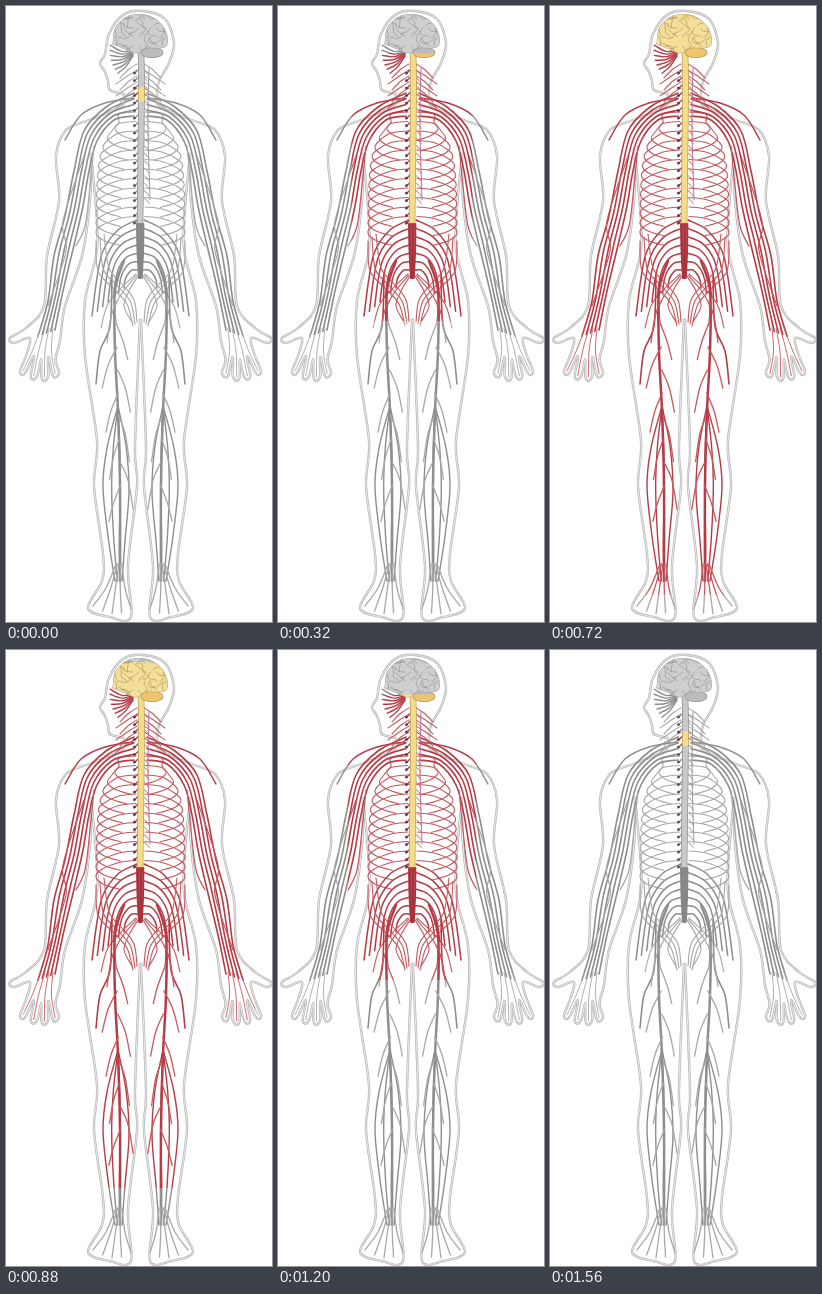
Write an HTML page with a canvas that moves like this. It is 266x616 px and loops after 1.6 s.

```html
<!DOCTYPE html>
<html lang="en">
<head>
<meta charset="utf-8">
<title>Nervous system</title>
<style>
  html, body { margin: 0; width: 100%; height: 100%; overflow: hidden; background: #fff; }
  canvas { display: block; }
</style>
</head>
<body>
<canvas id="stage" width="266" height="616"></canvas>
<script>
const W = 266, H = 616, AXIS = 134.5;
const REST = { nerve: '#8e8e8e', fine: '#a8a8a8', cord: '#c9c9c9', edge: '#8c8c8c', cauda: '#858585',
  brain: '#cfcfcf', cerebellum: '#bcbcbc', crease: '#959595', chain: '#9a9a9a', ganglion: '#555' };
const ACTIVE = { nerve: '#b53c46', fine: '#c6585f', cord: '#f3dd88', edge: '#b59a55', cauda: '#ab333e',
  brain: '#f5df98', cerebellum: '#f0c46c', crease: '#ab9868', chain: '#c46a8e', ganglion: '#573f49' };

const mix = (a, b, t) => a + (b - a) * t;
const range = n => [...Array(n).keys()];

function seeded(seed) {
  return () => (seed = seed * 16807 % 2147483647) / 2147483647;
}

// Smooth line through the points x0, y0, x1, y1, ...
function curve(g, p, color, width) {
  const n = p.length / 2;
  const at = i => { i = Math.max(0, Math.min(n - 1, i)); return [p[2 * i], p[2 * i + 1]]; };
  g.beginPath();
  g.moveTo(p[0], p[1]);
  for (let i = 0; i < n - 1; i++) {
    const [a, b, c, d] = [-1, 0, 1, 2].map(k => at(i + k));
    g.bezierCurveTo(b[0] + (c[0] - a[0]) / 6, b[1] + (c[1] - a[1]) / 6,
      c[0] - (d[0] - b[0]) / 6, c[1] - (d[1] - b[1]) / 6, c[0], c[1]);
  }
  g.strokeStyle = color;
  g.lineWidth = width;
  g.stroke();
}

// Evenly spread lines between two guide curves.
function bundle(g, from, to, count, color, width) {
  for (const i of range(count))
    curve(g, from.map((v, k) => mix(v, to[k], i / (count - 1))), color, width);
}

function oval(g, x, y, rx, ry, fill) {
  g.beginPath();
  g.ellipse(x, y, rx, ry, 0, 0, 7);
  g.fillStyle = fill;
  g.fill();
}

// Draws the left half, then its mirror image.
function bothSides(g, draw) {
  draw();
  g.save();
  g.transform(-1, 0, 0, 1, 2 * AXIS, 0);
  draw();
  g.restore();
}

const fingertip = i => [17 + 10.7 * i, 369 + 6 * Math.sin(i * 0.9)];

function outline(g) {
  const fingers = range(4).flatMap(i => {
    const [x, y] = fingertip(i);
    return [mix(x, 38, 0.3) - 3, y - 20, x - 3, y - 4, x, y, x + 4, y - 5, mix(x, 40, 0.3) + 3, y - 18];
  });
  const arm = [118, 88, 116, 100, 86, 113, 60, 124, 50, 150, 53, 195, 41, 250, 38, 300, 20, 322, 4, 332,
    8, 337, 24, 332, ...fingers, 54, 335, 59, 300, 76, 250, 84, 195, 85, 148];
  const leg = [85, 148, 91, 215, 90, 250, 79, 295, 79, 350, 91, 435, 88, 480, 97, 548, 96, 575, 82, 602,
    104, 611, 125, 611, 122, 560, 131, 480, 129, 440, 134, 314];
  const head = [118, 88, 104, 84, 102, 75, 99, 66, 94, 57, 99, 48, 103, 28, 117, 9, 137, 5,
    159, 13, 168, 37, 163, 57, 153, 75, 151, 88];
  for (const [color, width] of [['#b6b6b6', 2.4], ['#f0f0f0', 0.9]]) {
    bothSides(g, () => [arm, leg].forEach(p => curve(g, p, color, width)));
    curve(g, head, color, width);
  }
}

function ribs(g, c) {
  for (const i of range(12)) {
    const y = 106 + i * 9.5, x = 128 - 38 * (1 - 0.5 * Math.exp(-i / 2));
    curve(g, [130, y, 113, y + 2, x + 4, y + 10, x, y + 17, x + 8, y + 24, x + 24, y + 29], c.fine, 1.1);
  }
}

function armNerves(g, c) {
  curve(g, [127, 92, 99, 97, 75, 109, 59, 134], c.nerve, 1.4);
  bundle(g, [128, 87, 100, 101, 78, 125, 68, 165, 59, 210, 48, 250, 42, 295, 32, 330],
    [128, 110, 108, 114, 91, 135, 83, 165, 77, 200, 69, 235, 57, 285, 49, 324], 5, c.nerve, 1.6);
  bundle(g, [78, 150, 57, 215, 60, 245, 42, 300], [88, 140, 84, 180, 79, 220, 70, 240], 2, c.fine, 1.2);
  for (const i of range(4)) {
    const [x, y] = fingertip(i);
    curve(g, [35 + 4 * i, 322, mix(x, 40, 0.4), 345, x, y - 4], c.fine, 0.9);
  }
}

function pelvicNerves(g, c) {
  bundle(g, [131, 214, 112, 224, 97, 245, 91, 272, 86, 310],
    [132, 264, 126, 264, 122, 268, 119, 274, 118, 282], 7, c.nerve, 1.5);
  bundle(g, [90, 235, 92, 265, 108, 283, 121, 298, 127, 320],
    [98, 228, 103, 262, 116, 278, 128, 294, 131, 316], 3, c.fine, 1.1);
  bundle(g, [130, 268, 112, 285, 101, 300, 95, 322], [132, 270, 123, 285, 118, 300, 126, 316], 3, c.fine, 1.1);
}

function legNerves(g, c) {
  const random = seeded(11);
  curve(g, [118, 255, 109, 285, 109, 345, 112, 405, 114, 480, 114, 575], c.nerve, 2.5);
  curve(g, [106, 270, 104, 320, 94, 345, 90, 378], c.nerve, 1.6);
  bundle(g, [112, 400, 101, 442, 97, 480, 102, 530, 109, 575],
    [112, 400, 120, 440, 123, 485, 119, 535, 116, 575], 4, c.nerve, 1.4);
  for (const i of range(9)) {
    const side = i % 2 ? 1 : -1, y = 295 + i * 23, reach = 9 + 7 * random();
    const x = 110 + (y - 295) * 0.025;
    curve(g, [x, y, x + side * reach * 0.6, y + 18, x + side * reach, y + 35 + 15 * random()], c.fine, 1.3);
  }
  for (const i of range(5)) {
    const x = 87 + 9.5 * i;
    curve(g, [110 + 1.5 * i, 558, mix(x, 113, 0.5), 582, x, 600 + 8 * Math.sin(i * 0.7)], c.fine, 1.3);
  }
}

function spine(g, c) {
  for (const i of range(6)) {
    const y = 58 + i * 6, reach = 16 + i % 2 * 4;
    curve(g, [131, y, 123, y + 5, 130 - reach, y + 14], c.fine, 1.1);
    curve(g, [138, y, 146, y + 5, 139 + reach, y + 14], c.fine, 1.1);
  }
  curve(g, [143, 62, 142, 120, 144, 194], c.chain, 1);
  for (let y = 66; y < 217; y += 7.5) {
    curve(g, [132, y - 2, 128, y + 2], c.nerve, 1.2);
    oval(g, 128.5, y + 1, 1.5, 1.3, c.ganglion);
    if (y < 195) curve(g, [137, y - 2, 141, y + 1, 143, y + 4], c.chain, 1);
  }
  const cord = [135, 46, 135.5, 90, 134, 220];
  curve(g, cord, c.edge, 6.6);
  curve(g, cord, c.cord, 5.2);
  for (const i of range(5)) curve(g, [131 + i * 1.6, 218, 131.5 + i * 1.4, 245, 133 + i * 0.7, 272], c.cauda, 1.9);
}

function brain(g, c) {
  for (const i of range(7)) {
    const angle = 3.3 - i * 0.17, dx = Math.cos(angle), dy = Math.sin(angle);
    curve(g, [127, 44 + i, 127 + 11 * dx, 47 + i + 10 * dy, 127 + 23 * dx, 43 + i + 24 * dy], c.nerve, 1.4);
  }
  oval(g, 146, 46.5, 11.5, 5.5, c.crease);
  oval(g, 146, 46.5, 10.8, 4.8, c.cerebellum);
  curve(g, [107, 38, 110, 21, 123, 10, 143, 10, 158, 22, 160, 40, 140, 42, 130, 47, 117, 42, 107, 38], c.crease, 1);
  g.fillStyle = c.brain;
  g.fill();
  g.save();
  g.clip();
  const random = seeded(5);
  for (const i of range(36)) {
    let x = 109 + i % 9 * 6, y = 13 + Math.floor(i / 9) * 9, heading = random() * 6;
    const fold = [x, y];
    for (const k of range(4)) {
      heading += 2 * random() - 1;
      fold.push(x += 3 * Math.cos(heading), y += 3 * Math.sin(heading));
    }
    curve(g, fold, c.crease, 0.7);
  }
  g.restore();
}

function figure(c) {
  const layer = document.createElement('canvas');
  layer.width = W;
  layer.height = H;
  const g = layer.getContext('2d');
  g.fillStyle = '#fff';
  g.fillRect(0, 0, W, H);
  g.lineCap = g.lineJoin = 'round';
  outline(g);
  bothSides(g, () => [ribs, pelvicNerves, armNerves, legNerves].forEach(part => part(g, c)));
  spine(g, c);
  brain(g, c);
  return layer;
}

const stage = document.getElementById('stage').getContext('2d');
const resting = figure(REST), active = figure(ACTIVE);
const start = performance.now();

// A rectangle of activity grows from the neck over the whole body and shrinks back.
function render() {
  const step = Math.floor((performance.now() - start) / 40) % 40;
  const spread = step < 20 ? step / 19 : (39 - step) / 20;
  const left = 127.5 - 128 * spread, right = 140.5 + 128 * spread;
  const top = 81 - 81 * spread, bottom = 96 + 520 * spread;
  stage.drawImage(resting, 0, 0);
  stage.save();
  stage.beginPath();
  stage.rect(left, top, right - left, bottom - top);
  stage.clip();
  stage.drawImage(active, 0, 0);
  stage.restore();
  requestAnimationFrame(render);
}
render();
</script>
</body>
</html>
```
